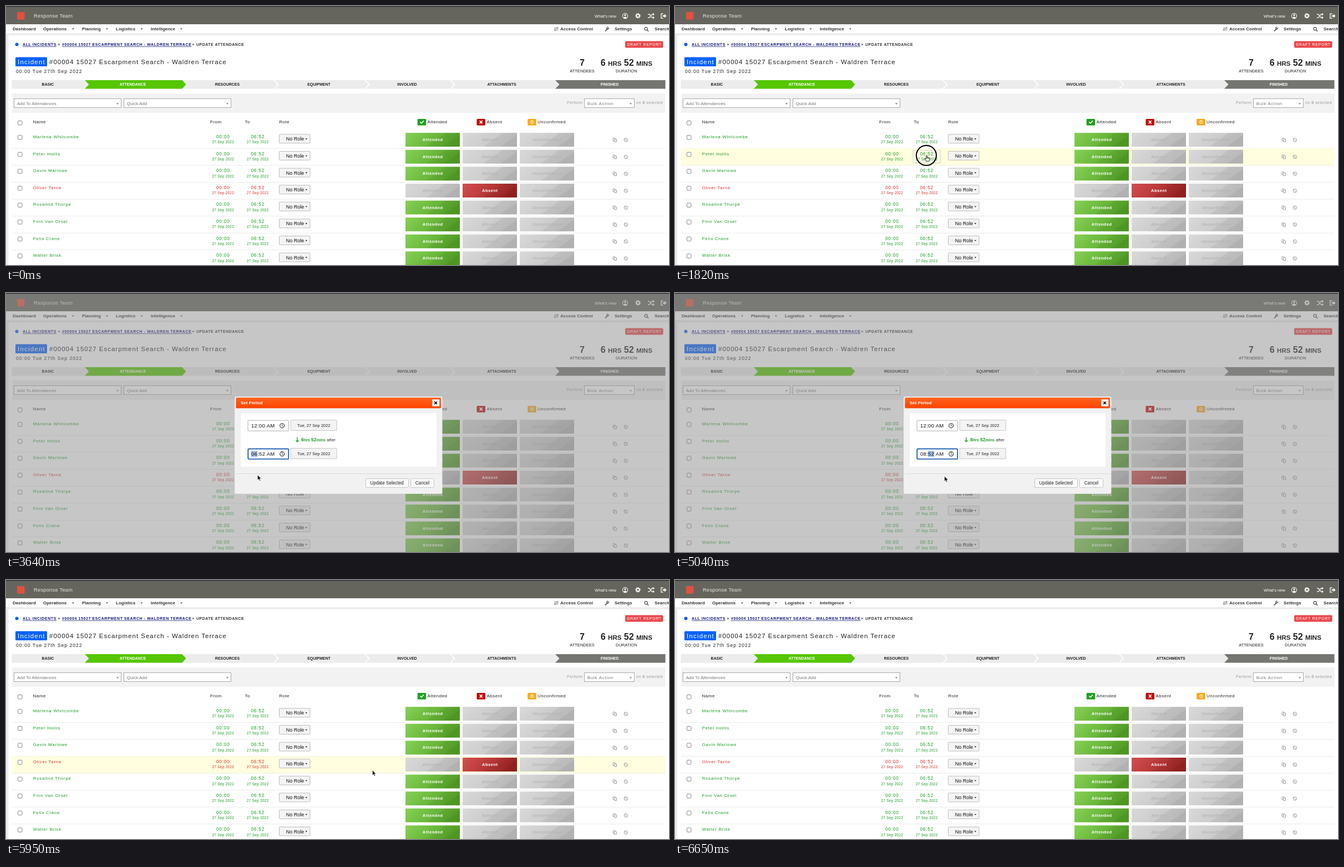
An HTML page for the animation above (6720 ms loop, 1195x468 px).

```html
<!DOCTYPE html>
<html lang="en">
<head>
<meta charset="utf-8">
<title>Update attendance</title>
<style>
  html, body { margin: 0; width: 100%; height: 100%; overflow: hidden; background: #fff; }
  svg { display: block; width: 1195px; height: 468px; font-family: "Liberation Sans", Arial, sans-serif; }
  text { white-space: pre; }
</style>
</head>
<body>
<svg id="stage" viewBox="0 0 1195 468" xmlns="http://www.w3.org/2000/svg"></svg>
<script>
const LOOP = 6720, STEP = 70;
const ROW_TOP = 226.4, ROW_H = 30.6;
const GREEN = '#1e9a28', RED = '#d8302c';
const people = ['Marlena Whitcombe', 'Peter Hollis', 'Gavin Marlowe', 'Oliver Tarne',
  'Rosalind Thorpe', 'Finn Van Orsel', 'Felix Crane', 'Walter Brisk'];
const incident = '#00004 15027 Escarpment Search - Waldren Terrace';

// Drawing helpers: each returns SVG markup
const rect = (x, y, w, h, fill, more = '') =>
  `<rect x="${x}" y="${y}" width="${w}" height="${h}" fill="${fill}" ${more}/>`;
const box = (x, y, w, h, fill, line, r = 0) =>
  rect(x + .5, y + .5, w - 1, h - 1, fill, `stroke="${line}" rx="${r}"`);
const path = (d, fill, more = '') => `<path d="${d}" fill="${fill}" ${more}/>`;
const line = (d, color, w = 1) =>
  path(d, 'none', `stroke="${color}" stroke-width="${w}" stroke-linecap="round" stroke-linejoin="round"`);
const ring = (x, y, r, color, w = 1) =>
  `<circle cx="${x}" cy="${y}" r="${r}" fill="none" stroke="${color}" stroke-width="${w}"/>`;
const dot = (x, y, r, fill) => `<circle cx="${x}" cy="${y}" r="${r}" fill="${fill}"/>`;
const caret = (x, y, r = 2, color = '#444') => path(`M${x - r} ${y - r / 2}h${2 * r}l${-r} ${r * 1.2}z`, color);
const group = (id, body, more = '') => `<g id="${id}" ${more}>${body}</g>`;
const text = (x, y, s, size, fill = '#222', o = {}) =>
  `<text x="${x}" y="${y}" font-size="${size}" fill="${fill}"` +
  (o.bold ? ' font-weight="700"' : '') + (o.ls ? ` letter-spacing="${o.ls}"` : '') +
  (o.mid ? ' text-anchor="middle"' : '') + (o.under ? ' text-decoration="underline"' : '') +
  (o.id ? ` id="${o.id}"` : '') + `>${s}</text>`;
const small = (s, size) => `<tspan font-size="${size}">${s}</tspan>`;

const gradient = (id, a, b) =>
  `<linearGradient id="${id}" x2="1" y2=".25"><stop stop-color="${a}"/><stop offset="1" stop-color="${b}"/></linearGradient>`;
const defs = '<defs>' + gradient('on', '#85d155', '#56a528') + gradient('off', '#d9d9d9', '#c3c3c3') +
  gradient('no', '#d55050', '#9f2424') +
  '<linearGradient id="bar" x2="0" y2="1"><stop stop-color="#ff641f"/><stop offset="1" stop-color="#ff4300"/></linearGradient></defs>';

function topBar() {
  const w = '#f4f4f2';
  const icons =
    ring(1116, 18, 4.6, w, 1.1) + dot(1116, 16.6, 1.7, w) + path('M1112.8 21.2q3.2-4 6.4 0q-3.2 2.6-6.4 0z', w) +
    ring(1139, 17.7, 2.7, w, 2) + `<circle cx="1139" cy="17.7" r="4" fill="none" stroke="${w}" stroke-width="1.6" stroke-dasharray="1.57"/>` +
    line('M1157.5 15h2l5 6h2.5M1157.5 21h2l5-6h2.5', w, 1.4) +
    path('M1166 12.6l3 2.4-3 2.4zM1166 18.6l3 2.4-3 2.4z', w) +
    line('M1184 14h-3.2v8h3.2', w, 1.3) + path('M1183.5 16.8h3.2v-2.6l4 3.8-4 3.8v-2.6h-3.2z', w);
  return rect(0, 0, 1195, 33, '#65655e') + rect(0, 0, 1195, 1.5, '#33333a') +
    rect(20, 11, 13.5, 13.5, '#e2513f') +
    text(50, 20.6, 'Response Team', 9.3, '#e4e4e0', { ls: .25 }) +
    text(1061, 20.8, "What's new", 7.6, '#fff') + icons;
}

function nav() {
  const left = [['Dashboard', 12], ['Operations', 67, 121], ['Planning', 137, 182],
    ['Logistics', 198, 244.5], ['Intelligence', 261, 316]];
  const right = [['Access Control', 999], ['Settings', 1097], ['Search', 1169]];
  return rect(0, 33, 1195, 16, '#fff') +
    [...left, ...right].map(([s, x, c]) =>
      text(x, 44.2, s, 8, '#333', { bold: 1 }) + (c ? caret(c, 41.4) : '')).join('') +
    line('M988.5 40h6.5M988.5 43h6.5M993.5 38.4l1.8 1.6M990 44.6l-1.8-1.6', '#444', .9) +
    line('M1080.5 45l3.6-3.8', '#444', 1.7) + line('M1086.4 39.4a1.8 1.8 0 1 1-1.5-1.2', '#444', 1.2) +
    ring(1153.6, 41.2, 2.6, '#444', 1.1) + line('M1155.6 43.2l2.2 2.4', '#444', 1.3);
}

function heading() {
  const crumb = { bold: 1, ls: .6 }, link = { ...crumb, under: 1 }, stat = { bold: 1, mid: 1 };
  return dot(19.5, 69.4, 3, '#0a5cf0') +
    text(30, 72, 'ALL INCIDENTS', 7, '#16167c', link) +
    text(93.5, 72, '»', 7, '#444', crumb) +
    text(101, 72, incident.toUpperCase(), 7, '#16167c', link) +
    text(335.5, 72, '»', 7, '#444', crumb) +
    text(343, 72, 'UPDATE ATTENDANCE', 7, '#333', { bold: 1, ls: .5 }) +
    rect(1116, 63.5, 68.5, 12, '#ea474b', 'rx="2"') +
    text(1119.2, 72.1, 'DRAFT REPORT', 7, '#fff', { ls: .7 }) +
    rect(17, 92.5, 57, 16.5, '#0561fb', 'rx="1.5"') +
    text(21, 105, 'Incident', 11.5, '#fff', { ls: 1.2 }) +
    text(78, 105, incident, 11.5, '#222', { ls: 1 }) +
    text(18, 121.2, '00:00 Tue 27th Sep 2022', 8.6, '#222', { ls: 1 }) +
    text(1038.5, 107.6, '7', 16, '#222', stat) +
    text(1118.3, 107.6, `6 ${small('HRS', 11.5)} 52 ${small('MINS', 11.5)}`, 16, '#222', stat) +
    text(1038.5, 120, 'ATTENDEES', 7.5, '#222', { mid: 1 }) +
    text(1118.3, 120, 'DURATION', 7.5, '#222', { mid: 1 });
}

function steps() {
  const labels = [['BASIC', 75.5], ['ATTENDANCE', 228.5, 1], ['RESOURCES', 399], ['EQUIPMENT', 564],
    ['INVOLVED', 723], ['ATTACHMENTS', 893.5], ['FINISHED', 1088, 1]];
  return rect(10.5, 134, 1178, 15.5, '#ececec') +
    path('M142 134H317.5L324.5 141.7 317.5 149.5H142L149.5 141.7z', '#55c600') +
    path('M990 134H1188.5V149.5H990L997.5 141.7z', '#757571') +
    [483, 647, 801].map(x => line(`M${x} 134l7.5 7.7-7.5 7.8`, '#fff', 1.7)).join('') +
    labels.map(([s, x, lit]) => text(x, 143.9, s, 7, lit ? '#fff' : '#222', { bold: 1, mid: 1 })).join('');
}

function filters() {
  const pick = (x, w, s, ls) => box(x, 167, w, 17, '#fff', '#aaa') +
    text(x + 5.7, 178.6, s, 8, '#777', { ls }) + caret(x + w - 7, 176.5, 2, '#777');
  return rect(11, 158, 1177.5, 35, '#f2f2f2') +
    pick(14, 194, 'Add To Attendances') + pick(212, 194, 'Quick Add') + pick(1042, 91, 'Bulk Action', .7) +
    text(1011, 177.4, 'Perform', 7, '#999', { ls: .5 }) +
    text(1136, 177.4, 'on <tspan font-weight="700">0</tspan> selected', 7, '#999', { ls: .5 });
}

const check = y => box(21, y, 8.5, 8.5, '#fff', '#858585', 1.5);

function tableHead() {
  const heads = [['Name', 48.5], ['From', 368], ['To', 430.5], ['Role', 492.5],
    ['Attended', 759.5], ['Absent', 866.5], ['Unconfirmed', 958]];
  const badge = (x, c) => rect(x, 204, 15.5, 11.7, c, 'rx="1.5"');
  return check(207) + heads.map(([s, x]) => text(x, 212.4, s, 8, '#222', { ls: .5 })).join('') +
    badge(741.7, '#229f22') + line('M746.8 210l1.9 2 3.8-4.2', '#fff', 1.6) +
    badge(848.5, '#c00808') + line('M854.2 207.7l4 4.2M858.2 207.7l-4 4.2', '#fff', 1.7) +
    badge(940.2, '#f9a91c') + ring(948, 209.8, 2.8, '#fff', 1) + line('M948 208.4v1.6M948 211.4v.1', '#fff', 1);
}

function pill(x, y, label, kind) {
  const fill = kind === 'off' ? '#b4b4b4' : '#fff';
  return rect(x, y, 98, 25, `url(#${kind})`) +
    path(`M${x + 38} ${y + 25}L${x + 72} ${y}H${x + 98}V${y + 25}z`, '#000', 'opacity=".05"') +
    path(`M${x + 68} ${y + 25}L${x + 98} ${y + 4}V${y + 25}z`, '#000', 'opacity=".04"') +
    text(x + 49.3, y + 15, label, 7.5, fill, { bold: 1, mid: 1, ls: .55 });
}

function row(name, i) {
  const y = ROW_TOP + i * ROW_H, away = i === 3, c = away ? RED : GREEN;
  const when = (x, hour, id) => text(x, y + 12.6, hour, 8.3, c, { mid: 1, ls: .8, id }) +
    text(x, y + 21.9, '27 Sep 2022', 6.5, c, { mid: 1, ls: .25 });
  const g = '#9a9a9a', cy = y + 15.4;
  return rect(11, y + .3, 1177.5, ROW_H, '#ffffdf', 'class="hover" visibility="hidden"') +
    (i === 1 ? group('cell', box(428.5, y + 3.3, 50, 24, '#fdfde9', '#cfcfc4')) : '') +
    rect(11, y + ROW_H - .1, 1177.5, .8, '#e6e6e6') +
    check(y + 6.8) + text(48.7, y + 12.6, name, 8, c, { ls: .7 }) +
    when(391.3, '00:00') + when(453.8, '06:52', 'end' + i) +
    box(492, y + 5, 56.5, 17, '#f4f4f4', '#bdbdbd', 1) + text(504.7, y + 16.9, 'No Role', 9, '#111') + caret(541.3, y + 13.8, 1.8, '#222') +
    pill(720, y + 2.8, 'Attended', away ? 'off' : 'on') +
    pill(823, y + 2.8, 'Absent', away ? 'no' : 'off') +
    pill(926, y + 2.8, 'Unconfirmed', 'off') +
    box(1093.5, cy - 3.6, 5, 6, 'none', g, .5) + box(1096, cy - 1.8, 5, 6, '#fff', g, .5) +
    ring(1117.3, cy + .2, 3.2, g, 1) + line(`M1115.2 ${cy - 1.8}l4.2 4`, g, 1);
}

function timeField(id, y, value) {
  return box(435.5, y, 74.5, 20, '#fff', '#b0b0b0', 1) +
    group('focus' + id, rect(436.4, y + .8, 72.8, 18.4, 'none', 'stroke="#1459b3" stroke-width="1.7" rx="1.5"')) +
    `<rect id="sel${id}" x="441.5" y="${y + 4.2}" width="11.5" height="11.4" fill="#a9c4ee"/>` +
    text(442, y + 13.6, value, 9.5, '#111', { ls: .3, id: 'val' + id }) +
    ring(497.7, y + 10, 3.9, '#222', 1.1) + line(`M497.7 ${y + 7.8}v2.4l1.7 1`, '#222', .9) +
    box(512.7, y - .7, 84, 20, '#f3f3f3', '#c6c6c6', 1) +
    text(554.7, y + 12.1, 'Tue, 27 Sep 2022', 7.5, '#222', { mid: 1 });
}

function dialog() {
  return rect(0, 1.5, 1195, 467, '#8d8d8d', 'opacity=".5"') +
    rect(412.5, 187.5, 373.5, 175, '#f1f1f1', 'stroke="#ececec" stroke-width=".8" rx="2"') +
    rect(414.5, 189, 369.5, 19.3, 'url(#bar)', 'rx="1.5"') +
    text(423, 201.2, 'Set Period', 8, '#fff', { bold: 1 }) +
    box(768, 192, 13.5, 13, '#fafafa', '#d8d8d8', 1) + line('M772.8 196.8l3.6 3.6M776.4 196.8l-3.6 3.6', '#111', 1.7) +
    rect(423, 217, 353, 97, '#fff') +
    timeField('A', 229.7, '12:00 AM') + timeField('B', 280.8, '06:52 AM') +
    line('M525 261v8M522.7 266.5l2.3 2.6 2.3-2.6', '#239b2b', 1.3) +
    text(532, 268, `<tspan id="hours">6</tspan>${small('hrs', 7)} 52${small('mins', 7)}`, 8.5, '#239b2b', { bold: 1 }) +
    text(578, 268, 'after', 8, '#333') +
    rect(414, 326, 371, 1, '#d9d9d9') +
    '<rect id="update" x="648.5" y="335.5" width="77" height="16" stroke="#c4c4c4" rx="1.5"/>' +
    text(656.3, 346, 'Update Selected', 8.2, '#222') +
    box(729, 335, 43, 17, '#fbfbfb', '#c9c9c9', 2) + text(737.7, 346, 'Cancel', 8.2, '#222');
}

const pointer =
  group('arrow', path('M0 0V10L2.3 7.9 3.9 11.5 5.6 10.7 4 7.3H7.1z', '#000', 'stroke="#fff" stroke-width=".7"'),
    'transform="translate(.4 .8) scale(.92)"') +
  group('hand', path('M-1 1Q0-.6 1 1V4.6Q2.2 3.6 3 4.9 4.2 4.2 4.8 5.5 6.2 5 6.3 6.6V9Q6 11 5 12V13H-.6V12L-3.6 8Q-4.4 6.6-2.8 6.4L-1 7.8z',
    '#fff', 'stroke="#000" stroke-width="1"') + line('M1 4.6V7M3 5V7.2M4.8 5.6V7.3', '#000', .7),
    'transform="translate(.6 .8) scale(.84)"');

document.getElementById('stage').innerHTML = defs +
  rect(0, 0, 1195, 468, '#ededed') + rect(4.5, 53, 1191, 415, '#fff') +
  topBar() + nav() + heading() + steps() + filters() + tableHead() + people.map(row).join('') +
  group('dialog', dialog()) + group('pointer', pointer) +
  '<circle id="click" fill="none" stroke="#000" stroke-width="2"/>';

const $ = id => document.getElementById(id);
const show = (el, on) => el.setAttribute('visibility', on ? 'visible' : 'hidden');
const toggle = (el, on) => { el.style.display = on ? '' : 'none'; };
const hovers = [...document.querySelectorAll('.hover')];

// time, x, y of the pointer tip
const track = [[490, 533, 428], [1120, 453, 269], [1960, 453, 269], [2590, 453, 290], [3220, 453, 290],
  [3500, 453, 328], [4970, 453, 328], [5250, 660, 343], [6090, 660, 343], [6440, 705, 482]];
// start, end, x, y of the click ring
const clicks = [[1540, 1960, 453, 270], [3150, 3360, 453, 290], [5810, 5950, 660.5, 343]];
const within = (t, a, b) => t >= a && t < b;

function pointerAt(t) {
  const n = track.findIndex(k => k[0] >= t);
  if (n < 0) return track[track.length - 1].slice(1);
  if (n === 0) return track[0].slice(1);
  const [t0, x0, y0] = track[n - 1], [t1, x1, y1] = track[n];
  const p = (t - t0) / (t1 - t0), e = p * p * (3 - 2 * p);
  return [x0 + (x1 - x0) * e, y0 + (y1 - y0) * e];
}

function draw(t) {
  const [x, y] = pointerAt(t);
  const hand = within(t, 1330, 1960) || within(t, 5460, 5950);
  const open = within(t, 1960, 5950), first = t < 3220, second = within(t, 3220, 5810), typed = t >= 4340;

  toggle($('pointer'), within(t, 490, 6440));
  $('pointer').setAttribute('transform', `translate(${x} ${y})`);
  toggle($('arrow'), !hand);
  toggle($('hand'), hand);

  const hit = clicks.find(c => within(t, c[0], c[1]));
  toggle($('click'), hit);
  if (hit) {
    $('click').setAttribute('cx', hit[2]);
    $('click').setAttribute('cy', hit[3]);
    $('click').setAttribute('r', Math.min(18, 12 + (t - hit[0]) / STEP * 6));
  }

  const live = within(t, 1540, 1960) || within(t, 5950, 6440);
  const over = live ? Math.floor((y - ROW_TOP) / ROW_H) : -1;
  hovers.forEach((el, i) => show(el, i === over));
  toggle($('cell'), within(t, 1540, 1960));
  $('end1').textContent = t >= 5950 ? '08:52' : '06:52';

  toggle($('dialog'), open);
  toggle($('focusA'), first);
  toggle($('selA'), first);
  toggle($('focusB'), second);
  toggle($('selB'), second);
  $('selB').setAttribute('x', typed ? 455.8 : 441.5);
  $('valB').textContent = typed ? '08:52 AM' : '06:52 AM';
  $('hours').textContent = typed ? 8 : 6;
  $('update').setAttribute('fill', t >= 5810 ? '#ebebeb' : '#fbfbfb');
}

const start = performance.now();
function tick() {
  const t = (performance.now() - start) % LOOP;
  draw(Math.floor(t / STEP) * STEP);
  requestAnimationFrame(tick);
}
tick();
</script>
</body>
</html>
```
